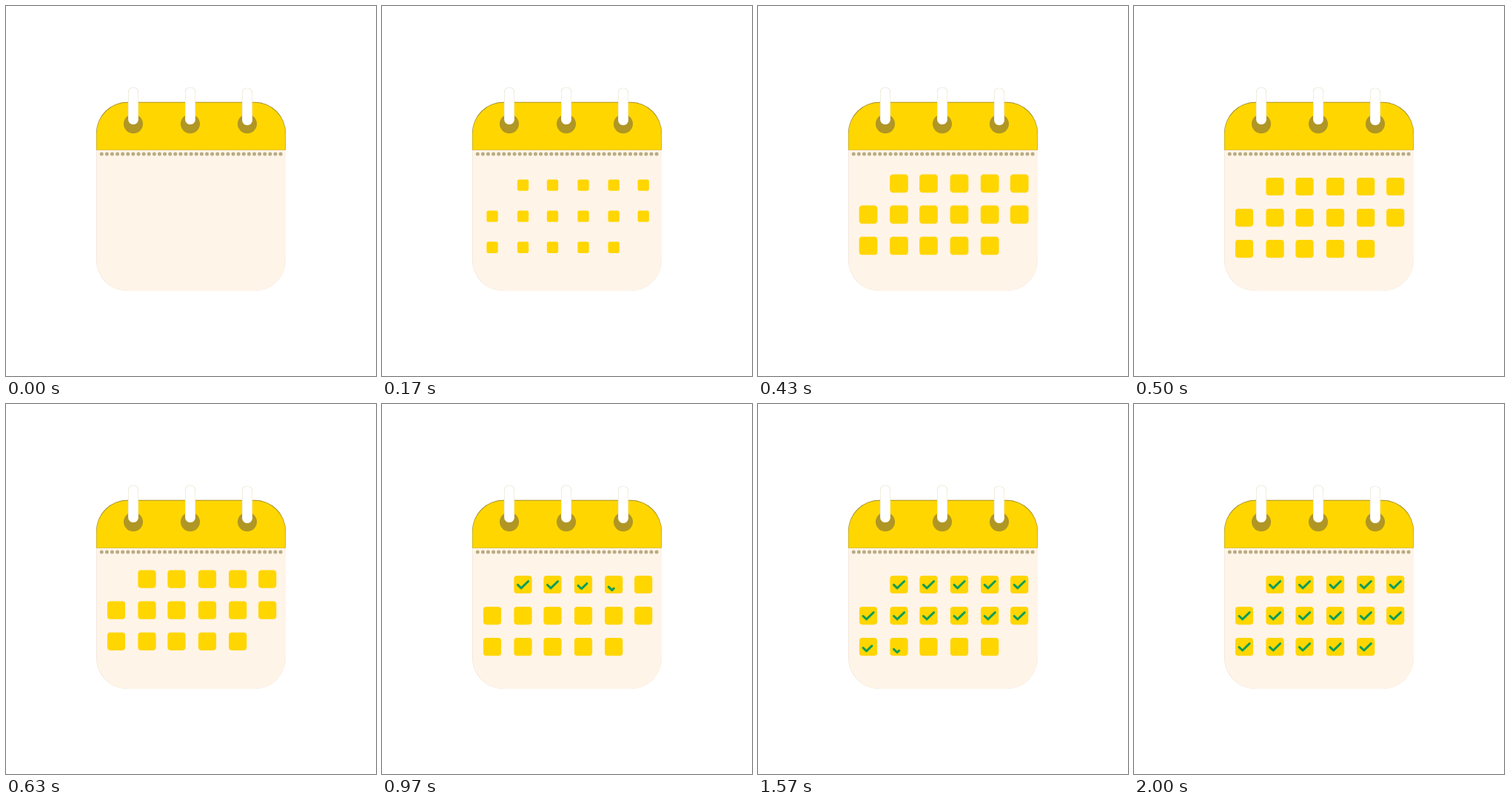
Recreate the animation shown at these times as an HTML page with a canvas. Size 500 by 500 pixels, loop 2.16 s.

```html
<!DOCTYPE html>
<html lang="en">
<head>
<meta charset="utf-8">
<title>Calendar</title>
<style>
  html, body { margin: 0; width: 100%; height: 100%; overflow: hidden; background: #fff; }
  canvas { display: block; width: 500px; height: 500px; }
</style>
</head>
<body>
<canvas id="stage" width="500" height="500"></canvas>
<script>
const ctx = document.getElementById('stage').getContext('2d');
const LOOP = 2160, STEP = 100 / 3;
const YELLOW = '#ffd600', CREAM = '#fff4e8', OLIVE = '#b09624', DOT = '#b9ab84', GREEN = '#0f9d58';
const COLS = [149, 190.5, 230.5, 272, 313.2, 353.2];
const ROWS = [244, 286.1, 328.2];

// Cells in reading order; the first and last places stay empty.
const cells = ROWS.flatMap(y => COLS.map(x => [x, y])).slice(1, -1);

const smooth = u => u * u * (3 - 2 * u);
const clamp = u => Math.max(0, Math.min(1, u));

// Eased value between [time, value] keys.
function track(t, keys) {
  for (let i = 1; i < keys.length; i++) {
    const [t0, a] = keys[i - 1], [t1, b] = keys[i];
    if (t < t1) return a + (b - a) * smooth(clamp((t - t0) / (t1 - t0)));
  }
  return keys[keys.length - 1][1];
}

// The cells grow while sliding up, drop back, and hop once more.
const SIZE = [[0, 0], [300, 26.2], [500, 24.2]];
const SHIFT = [[0, 18], [300, -16.2], [500, 0], [600, -10], [700, 0]];

function box(x, y, w, h, r, fill) {
  ctx.fillStyle = fill;
  ctx.beginPath();
  ctx.roundRect(x, y, w, h, r);
  ctx.fill();
}

function disc(x, y, r, fill) {
  ctx.fillStyle = fill;
  ctx.beginPath();
  ctx.arc(x, y, r, 0, Math.PI * 2);
  ctx.fill();
}

function drawPage() {
  const cap = [42, 42, 0, 0];
  box(122, 130, 256, 255, 42, '#e2d8c6');
  box(122.4, 130.2, 255.6, 254.8, 42, CREAM);
  box(122, 129.8, 256, 64.8, cap, '#8f7a14');
  box(122.4, 130.4, 255.2, 64.2, cap, YELLOW);
  for (let i = 0; i < 35; i++) disc(129.2 + i * 7.115, 200.1, 2.5, DOT);
  [172, 249, 326].forEach((x, i) => {
    const top = i === 2 ? 111 : 110;
    disc(x, 159.2, 13, OLIVE);
    box(x - 7, top - 0.3, 14, 50.6, 7, '#d3c898');
    box(x - 6.7, top, 13.4, 50, 6.7, '#fff');
  });
}

function drawTick(x, y, p) {
  if (p <= 0) return;
  const e = 1 - (1 - p) * (1 - p);
  const short = 6.4, long = 14;
  const len = e * (short + long);
  const a = Math.min(1, len / short), b = clamp((len - short) / long);
  const top = y + 5.5 * (1 - e);
  ctx.beginPath();
  ctx.moveTo(x - 7, top + 0.4);
  ctx.lineTo(x - 7 + 4.6 * a, top + 0.4 + 4.4 * a);
  if (b > 0) ctx.lineTo(x - 2.4 + 9.6 * b, top + 4.8 - 9.3 * b);
  ctx.stroke();
}

function draw(t) {
  ctx.fillStyle = '#fff';
  ctx.fillRect(0, 0, 500, 500);
  drawPage();
  const s = track(t, SIZE), dy = track(t, SHIFT);
  ctx.strokeStyle = GREEN;
  ctx.lineWidth = 3;
  ctx.lineCap = ctx.lineJoin = 'round';
  cells.forEach(([x, y], i) => {
    if (s > 0) box(x - s / 2, y + dy - s / 2, s, s, s * 0.17, YELLOW);
    drawTick(x, y, clamp((t - 703 - i * 2 * STEP) / 220));
  });
}

const start = performance.now();
function tick() {
  const t = (performance.now() - start) % LOOP;
  draw(Math.floor((t + 4) / STEP) * STEP);
  requestAnimationFrame(tick);
}
tick();
</script>
</body>
</html>
```
